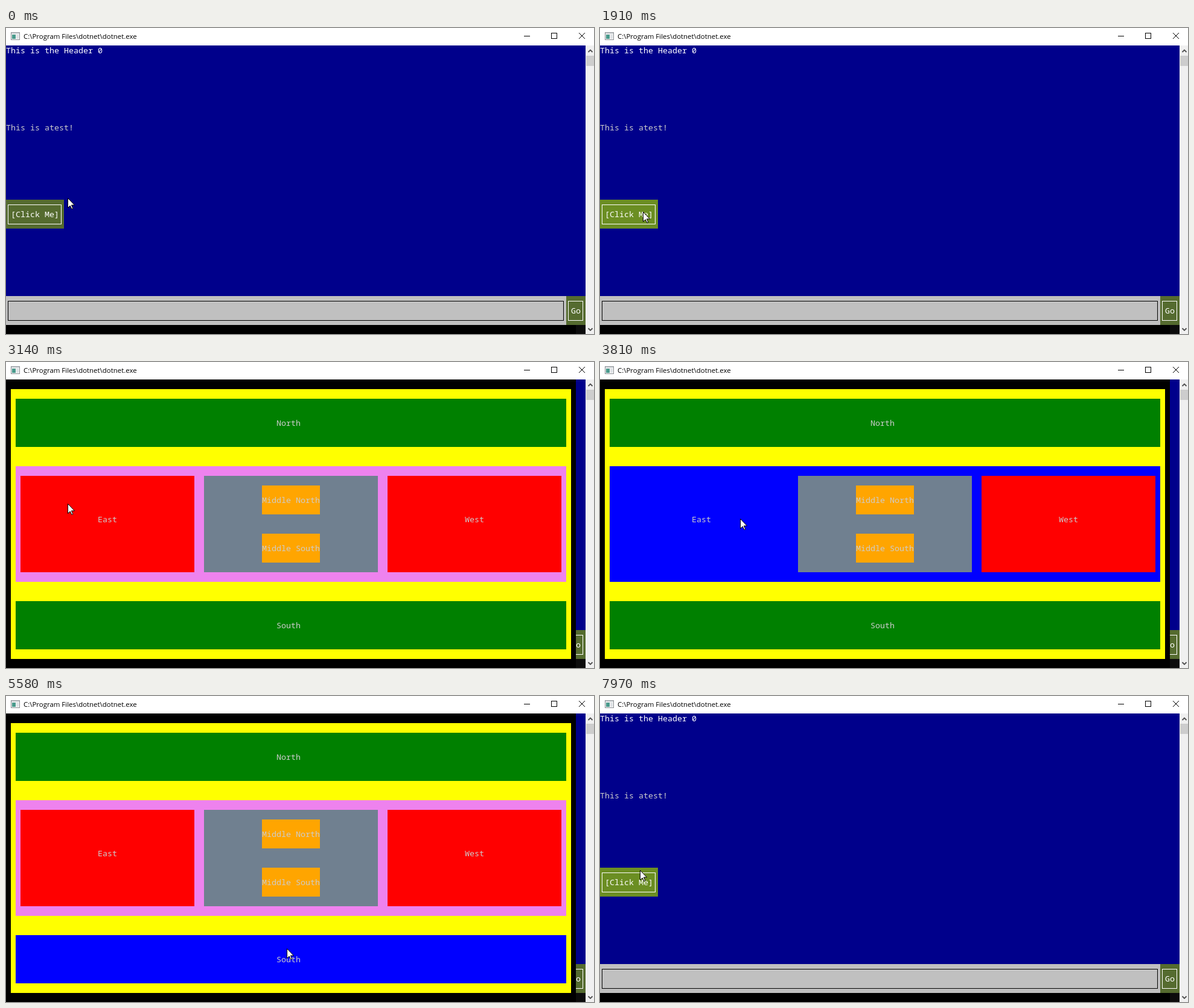
An HTML page for the animation above (8000 ms loop, 974 px wide and 508 px high).

```html
<!DOCTYPE html>
<html lang="en">
<head>
<meta charset="utf-8">
<title>Console layout demo</title>
<style>
  html, body { margin: 0; width: 100%; height: 100%; overflow: hidden; background: #000; }
  svg { display: block; }
  rect { shape-rendering: crispEdges; }
  text { font: 13.333px "Noto Sans Mono", "DejaVu Sans Mono", monospace; }
  .title { font: 11.45px "Open Sans", "Noto Sans", sans-serif; }
  .line { fill: none; stroke: #000; }
  .chevron { fill: none; stroke: #505050; stroke-width: 1.8; }
</style>
</head>
<body>
<svg id="stage" width="974" height="508" viewBox="0 0 974 508">
  <defs><clipPath id="wipe"><path id="wipeShape"/></clipPath></defs>
  <g id="form"></g>
  <g id="layout" clip-path="url(#wipe)"></g>

  <rect width="974" height="29" fill="#fff"/>
  <g>
    <rect x="8" y="7" width="15" height="13" fill="#8a8f94"/>
    <rect x="9" y="8" width="13" height="2" fill="#d5d9dc"/>
    <rect x="9" y="10" width="13" height="9" fill="#f4f4f4"/>
    <rect x="10" y="11" width="6" height="7" fill="#4a9a8c"/>
    <rect x="17" y="11" width="4" height="7" fill="#dfe3e6"/>
  </g>
  <text class="title" x="29" y="18">C:\Program Files\dotnet\dotnet.exe</text>
  <path class="line" d="M858 13.5h10M903.5 8.5h9v9h-9z" shape-rendering="crispEdges"/>
  <path class="line" d="M949 8l10 10M959 8l-10 10"/>

  <rect x="960" y="29" width="14" height="479" fill="#f0f0f0"/>
  <rect x="961" y="46" width="13" height="17" fill="#cdcdcd"/>
  <path class="chevron" d="M964.5 40l3.5-3.5 3.5 3.5M964.5 498.5l3.5 3.5 3.5-3.5"/>

  <path id="cursor" d="M.5.5V16.5L4.2 13l2.7 5.5 2-.9L6.4 12h5.1z" fill="#fff" stroke="#000"/>
</svg>
<script>
// Everything in the console sits on a grid of 8 x 16 character cells
const LOOP = 8000, TOP = 29, CW = 8, CH = 16, COLS = 118, ROWS = 29;
const $ = id => document.getElementById(id);
const form = $("form"), layout = $("layout"), hot = [];

function add(parent, tag, attrs, text) {
  const el = document.createElementNS("http://www.w3.org/2000/svg", tag);
  for (const key in attrs) el.setAttribute(key, attrs[key]);
  if (text) el.textContent = text;
  parent.append(el);
  return el;
}

const label = (parent, col, row, text, fill = "#ccc") =>
  add(parent, "text", { x: col * CW, y: TOP + row * CH + 13, fill }, text);

// A box in cells with a centred caption; "over" is its colour under the pointer
function panel(parent, col, row, cols, rows, fill, { text = "", ink, over, border } = {}) {
  const x = col * CW, y = TOP + row * CH, width = cols * CW, height = rows * CH;
  const el = add(parent, "rect", { x, y, width, height, fill });
  if (over) hot.push({ el, x, y, width, height, fill, over, onLayout: parent === layout });
  if (border) add(parent, "rect", {
    x: x + 3.5, y: y + 8.5, width: width - 8, height: height - 16, stroke: border, fill: "none"
  });
  label(parent, col + Math.floor((cols - text.length) / 2), row + Math.floor((rows - 1) / 2), text, ink);
}

const white = { ink: "#fff", border: "#fff" };
panel(form, 0, 0, 120, ROWS, "#00008b");
panel(form, COLS, ROWS, 2, 1, "#0c0c0c");
label(form, 0, 0, "This is the Header 0", "#fff");
label(form, 0, 8, "This is atest!");
panel(form, 0, 16, 12, 3, "#556b2f", { ...white, text: "[Click Me]", over: "#6b8e23" });
panel(form, 0, 26, 116, 3, "#c0c0c0", { border: "#000" });
panel(form, 116, 26, 4, 3, "#556b2f", { ...white, text: "Go" });

const over = "#00f";
panel(layout, 0, 0, COLS, ROWS, "#000");
panel(layout, 1, 1, 116, 28, "#ff0");
panel(layout, 2, 9, 114, 12, "#ee82ee", { over });
["East", "", "West"].forEach((text, i) =>
  panel(layout, 3 + 38 * i, 10, 36, 10, text ? "#f00" : "#708090", { text, over }));
["North", "South"].forEach((text, i) => {
  panel(layout, 2, 2 + 21 * i, 114, 5, "#008000", { text, over });
  panel(layout, 53, 11 + 5 * i, 12, 3, "#ffa500", { text: "Middle " + text, over });
});

// Each move eases from the last point to "to", optionally bent towards "bend"
const moves = [
  { start: 40, end: 210, to: [72, 290] },
  { start: 1140, end: 1300, to: [75, 388] },
  { start: 1680, end: 1910, to: [71, 305] },
  { start: 3140, end: 3430, to: [158, 97], bend: [125, 186] },
  { start: 3670, end: 4380, to: [385, 243], bend: [244, 397] },
  { start: 4610, end: 4730, to: [448, 228] },
  { start: 5030, end: 5220, to: [459, 300] },
  { start: 5410, end: 5580, to: [465, 419] },
  { start: 7420, end: 7970, to: [66, 289], bend: [110, 206] }
];
const FORWARD = 2390, BACK = 6490, HOVER_FROM = 3250;
const MOVE_TICK = 55, WIPE_TICK = 58;

function pointerAt(t) {
  let pos = [102, 282];
  for (const { start, end, to, bend } of moves) {
    if (t < start) break;
    const gaps = Math.round((end - start) / MOVE_TICK);
    const step = Math.min(gaps, Math.floor((t - start) / (end - start) * gaps + 1e-6));
    const v = (1 - (step + 1) / (gaps + 1)) ** 2, u = 1 - v;
    pos = pos.map((p, i) => {
      const mid = bend ? bend[i] : (p + to[i]) / 2;
      return Math.round(v * v * p + 2 * u * v * mid + u * u * to[i]);
    });
  }
  return pos;
}

// The console repaints column by column, from the left
function wipeAt(t) {
  const back = t >= BACK, since = t - (back ? BACK : FORWARD);
  const share = since < 0 ? 0 : Math.min(1, (Math.floor(since / WIPE_TICK) * WIPE_TICK + 26) / 230);
  const cells = Math.floor(share * COLS * ROWS);
  const x = Math.floor(cells / ROWS) * CW, y = TOP + cells % ROWS * CH;
  const next = y > TOP ? x + CW : x, edge = back ? COLS * CW : 0;
  return `M${edge} ${TOP}H${next}V${y}H${x}V${TOP + ROWS * CH}H${edge}z`;
}

function draw(t) {
  const [px, py] = pointerAt(t);
  $("cursor").setAttribute("transform", `translate(${px} ${py})`);
  for (const b of hot) {
    const inside = px >= b.x && px < b.x + b.width && py >= b.y && py < b.y + b.height;
    b.el.setAttribute("fill", inside && (!b.onLayout || t >= HOVER_FROM) ? b.over : b.fill);
  }
  $("wipeShape").setAttribute("d", wipeAt(t));
}

const began = performance.now();
function tick() {
  draw((performance.now() - began) % LOOP);
  requestAnimationFrame(tick);
}
tick();
</script>
</body>
</html>
```
